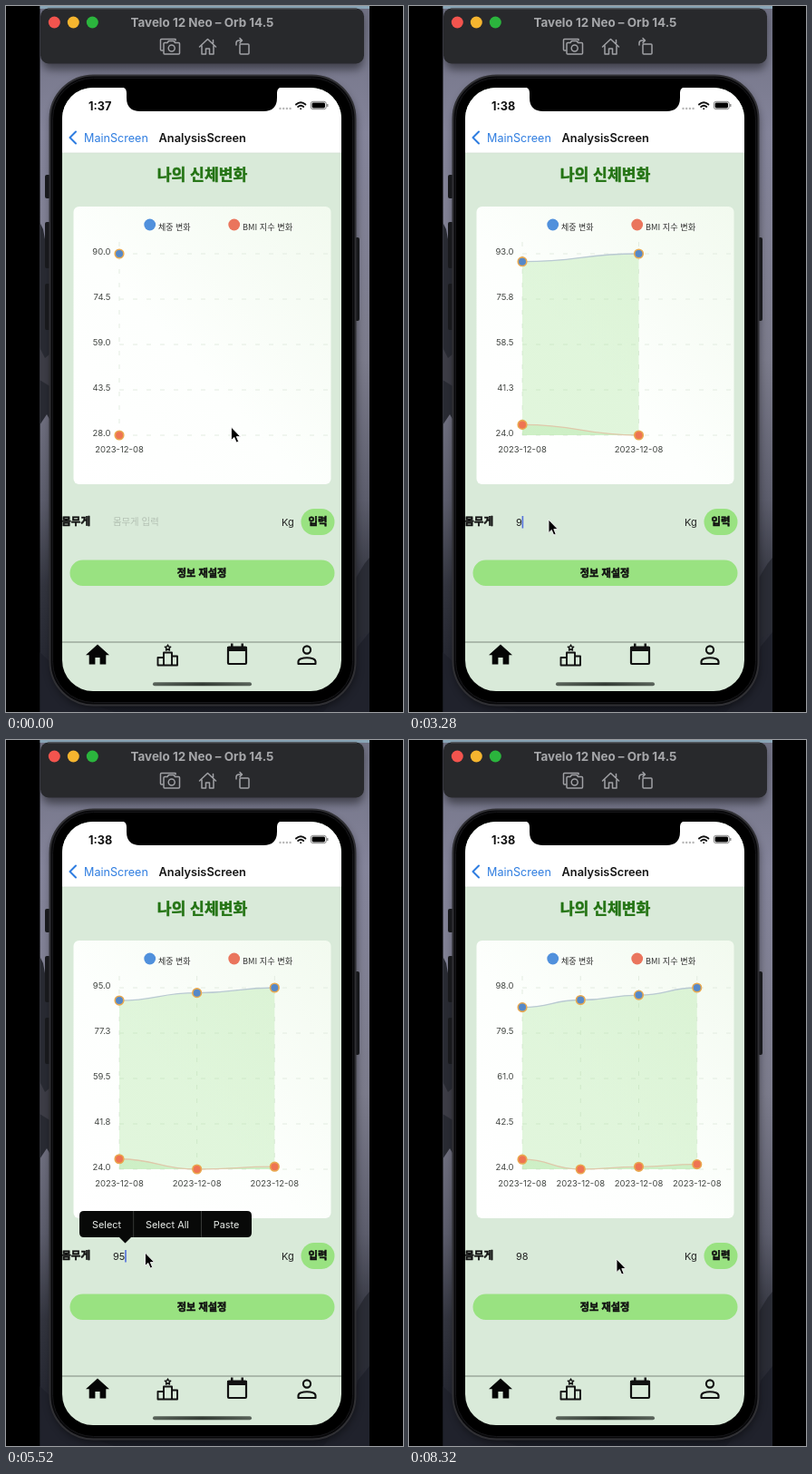
An HTML page for the animation above (8400 ms loop, 438 by 778 pixels).

```html
<!DOCTYPE html>
<html lang="ko">
<head>
<meta charset="utf-8">
<title>나의 신체변화</title>
<style>
  html, body { margin: 0; width: 100%; height: 100%; overflow: hidden; background: #000; }
  svg { display: block; width: 100%; height: 100%; filter: blur(.45px); font-family: Inter, 'Noto Sans CJK KR', 'Noto Sans CJK JP', sans-serif; }
  .ko { font-family: 'Noto Sans CJK KR', 'Noto Sans CJK JP', sans-serif; }
  .heavy { font-weight: 900; fill: #111; stroke: #111; stroke-width: .5; }
  .title { fill: #237313; stroke: #237313; }
  .mid { text-anchor: middle; }
  .end { text-anchor: end; }
  .line { fill: none; stroke-linejoin: round; stroke-linecap: round; }
</style>
</head>
<body>
<svg viewBox="0 0 438 778">
  <defs>
    <linearGradient id="sky" x2="0" y2="1">
      <stop offset="0" stop-color="#6f7082"/><stop offset=".18" stop-color="#84849a"/>
      <stop offset=".5" stop-color="#7b7b8b"/><stop offset=".7" stop-color="#5c5d6c"/>
      <stop offset=".82" stop-color="#33353f"/><stop offset="1" stop-color="#1c1e28"/>
    </linearGradient>
    <linearGradient id="card" x1="0" y1="1" x2="1" y2="0">
      <stop offset="0" stop-color="#fff"/><stop offset=".45" stop-color="#fdfffd"/><stop offset="1" stop-color="#f2faef"/>
    </linearGradient>
    <linearGradient id="area" gradientUnits="userSpaceOnUse" x1="0" y1="273" x2="0" y2="473">
      <stop offset="0" stop-color="#a8e39a" stop-opacity=".34"/><stop offset="1" stop-color="#a8e39a" stop-opacity=".34"/>
    </linearGradient>
    <linearGradient id="bar"><stop offset="0" stop-color="#59635a"/><stop offset=".5" stop-color="#343c35"/><stop offset="1" stop-color="#59635a"/></linearGradient>
    <clipPath id="wall"><rect x="37.5" width="363.5" height="778"/></clipPath>
    <clipPath id="screen"><rect x="62" y="90" width="308" height="665" rx="34"/></clipPath>
    <filter id="soft" x="-30%" y="-30%" width="160%" height="160%"><feGaussianBlur stdDeviation="5"/></filter>
  </defs>

  <rect width="438" height="778"/>
  <g clip-path="url(#wall)">
    <rect x="37" width="364" height="778" fill="url(#sky)"/>
    <rect x="37" width="364" height="3" fill="#8aa6b8"/>
    <path d="M37 238L41 246L45 268L52 290V462L45 450L37 462Z" fill="#292b33"/>
    <path d="M37 376L43 388L50 382V420L37 412Z" fill="#3d3d46"/>
    <path d="M401 608L396 614L391 622L384 634V700L401 690Z" fill="#2a2c35"/>
    <path d="M37 712L48 722L58 738L80 764L120 778H37ZM401 690L388 706L380 740L350 778H401Z" fill="#20222c"/>
    <rect x="40" y="8" width="354" height="62" rx="9" opacity=".45" filter="url(#soft)"/>
    <rect x="50" y="82" width="336" height="692" rx="48" opacity=".5" filter="url(#soft)"/>
  </g>

  <rect x="38" y="2.5" width="357" height="61" rx="9" fill="#28292c"/>
  <path d="M46 3H387" stroke="#55565a"/>
  <circle cx="53.3" cy="18" r="6.5" fill="#f3544e"/>
  <circle cx="74.3" cy="18" r="6.5" fill="#f5b52f"/>
  <circle cx="95.3" cy="18" r="6.5" fill="#2bb53d"/>
  <text class="mid" x="216.5" y="22.5" font-size="13.4" font-weight="700" fill="#a6a7aa">Tavelo 12 Neo – Orb 14.5</text>
  <g class="line" stroke="#a0a1a5" stroke-width="1.5">
    <path d="M173 49H171.5Q170.5 49 170.5 48V37.5Q170.5 36.5 171.5 36.5H187V38"/>
    <path d="M175 40.5H178L179.5 38.5H185L186.5 40.5H190.5Q191.5 40.5 191.5 41.5V52Q191.5 53 190.5 53H175Q174 53 174 52V41.5Q174 40.5 175 40.5Z"/>
    <circle cx="182.7" cy="46.5" r="3.5"/>
    <path d="M213.5 45L222.5 36.5L231.5 45M216 43.5V53H220.5V47H224.5V53H229V43.5M228.5 41V37.5"/>
    <path d="M258.5 42H267Q268 42 268 43V52Q268 53 267 53H259Q258 53 258 52V43Q258 42 259 42M254 43V41Q254 38 257 38H260M258 35.5L260.5 38L258 40.5"/>
  </g>

  <g fill="#18191c">
    <rect x="43" y="186" width="6" height="26" rx="2"/><rect x="43" y="238" width="6" height="51" rx="2"/>
    <rect x="43" y="306" width="6" height="51" rx="2"/><rect x="385" y="255" width="5" height="92" rx="2"/>
  </g>
  <rect x="48.5" y="76.5" width="337" height="694" rx="48" fill="#08080a" stroke="#303034" stroke-width="2"/>
  <rect x="51.5" y="79.5" width="331" height="688" rx="45" stroke="#17171a"/>

  <g clip-path="url(#screen)">
    <rect x="62" y="90" width="308" height="665" fill="#d9ead9"/>
    <rect x="62" y="90" width="308" height="72" fill="#fff"/>
    <path d="M62 162H370" stroke="#cfdccf" stroke-width=".7"/>
    <path d="M127 89Q133 90 133 96V101Q133 116 148 116H284Q299 116 299 101V96Q299 90 305 89Z"/>
    <text id="clock" x="91" y="114.5" font-size="12.7" font-weight="700" fill="#111"></text>
    <g fill="#b7b7b7"><circle cx="302.5" cy="113" r="1.2"/><circle cx="306.2" cy="113" r="1.2"/><circle cx="309.9" cy="113" r="1.2"/><circle cx="313.6" cy="113" r="1.2"/></g>
    <path class="line" d="M320 108.5Q325.2 103.8 330.4 108.5M322.2 111Q325.2 108.3 328.2 111M325.2 113.2V113.3" stroke="#111" stroke-width="1.9"/>
    <rect x="336.3" y="105.3" width="17" height="8.4" rx="2.5" fill="none" stroke="#777" stroke-width=".9"/>
    <rect x="337.6" y="106.6" width="14.4" height="5.8" rx="1.4"/><rect x="354.2" y="108" width="1.2" height="3" fill="#777"/>
    <path class="line" d="M77 138.5L70.5 145L77 151.5" stroke="#2f7de0" stroke-width="2"/>
    <text x="86" y="149.5" font-size="12.6" fill="#2f7de0">MainScreen</text>
    <text x="168.5" y="149.5" font-size="12.8" font-weight="600" fill="#151515">AnalysisScreen</text>
    <text class="ko heavy title mid" x="216.5" y="191.5" font-size="17.2">나의 신체변화</text>

    <rect x="74.5" y="221" width="284" height="306" rx="6" fill="url(#card)"/>
    <circle cx="158.7" cy="241" r="6.4" fill="#5090dc"/>
    <text class="ko" x="168" y="246.5" font-size="9" fill="#333">체중 변화</text>
    <circle cx="251.7" cy="241" r="6.4" fill="#ea755d"/>
    <text class="ko" x="261" y="246.5" font-size="9.2" fill="#333">BMI 지수 변화</text>
    <g id="chart"></g>

    <text class="ko heavy end" x="93" y="572" font-size="11.5">몸무게</text>
    <text id="hint" class="ko" x="118" y="572" font-size="10.4" fill="#b3c0b3">몸무게 입력</text>
    <text id="value" x="118" y="572.5" font-size="11" fill="#222"></text>
    <rect id="caret" y="562" width="1.6" height="13.5" fill="#526fdb"/>
    <text x="304" y="572.5" font-size="11" fill="#222">Kg</text>
    <rect x="325.5" y="554" width="37" height="29" rx="14.5" fill="#99e281"/>
    <text class="ko heavy mid" x="344" y="572.3" font-size="11.4">입력</text>
    <rect x="70.5" y="610.5" width="292" height="28.5" rx="14.25" fill="#99e281"/>
    <text class="ko heavy mid" x="216" y="629" font-size="11.2">정보 재설정</text>

    <g id="menu">
      <path d="M86 519H266Q271 519 271 524V543Q271 548 266 548H138L131.5 554.5L125 548H86Q81 548 81 543V524Q81 519 86 519Z" fill="#080908"/>
      <path d="M140.7 519V548M215.5 519V548" stroke="#4b504b" stroke-width=".7"/>
      <g class="mid" font-size="10.9" fill="#e8ece8"><text x="111" y="537.8">Select</text><text x="178" y="537.8">Select All</text><text x="243" y="537.8">Paste</text></g>
    </g>

    <path d="M62 701H370" stroke="#9ca89d" stroke-width="1.3"/>
    <path d="M101 703.5L114 715.3H110.3V725.6H103.6V718H98.4V725.6H91.7V715.3H88Z" fill="#050505"/>
    <g class="line" stroke="#111" stroke-width="1.9">
      <path d="M174 726.5V712.5H183V726.5M174 718H167.5V726.5H189V716.5H183"/>
      <path d="M178.5 704L179.5 706L181.7 706.3L180.1 707.8L180.5 710L178.5 709L176.5 710L176.9 707.8L175.3 706.3L177.5 706Z" stroke-width="1.4"/>
      <rect x="245" y="706.5" width="20" height="18.5" rx="1" stroke-width="2.2"/>
      <circle cx="332" cy="709.5" r="4.1" stroke-width="2.1"/>
      <path d="M322.5 725V722.5C322.5 716.8 341.5 716.8 341.5 722.5V725Z" stroke-width="2.1"/>
    </g>
    <path d="M244 706H266V711H244ZM248 702.5H250.5V707H248ZM259.5 702.5H262V707H259.5Z" fill="#111"/>
    <rect x="162" y="745.3" width="109" height="3.9" rx="1.95" fill="url(#bar)"/>
  </g>

  <path id="pointer" d="M0 0V14.5L3.3 11.4L5.7 17L8.1 15.9L5.8 10.6H10.2Z" stroke="#f4f4f4" stroke-width=".9"/>
</svg>
<script>
const LOOP = 8400, STEP = 80;
const $ = id => document.getElementById(id);

const WEIGHT = [90, 93, 95, 98], BMI = [28, 24, 25, 26];
const BASE = 473, HEIGHT = 200, LEFT = 125, SPAN = 257;

// Each list holds [start time, state].
const clockSteps = [[0, '1:37'], [560, '1:38']];
const countSteps = [[0, 1], [2320, 2], [4640, 3], [7680, 4]];
const valueSteps = [[0, ''], [1440, '9'], [1680, '93'], [3280, '9'], [3520, '95'],
  [6160, '9'], [6320, ''], [6960, '9'], [7120, '98']];
const focusSteps = [[0, false], [960, true], [7920, false]];
const menuSteps = [[0, false], [5360, true], [6000, false]];
const pointerPath = [[0, 248.5, 464], [400, 248.5, 464], [960, 204, 571], [1680, 204, 571],
  [2240, 337.5, 564], [2560, 337.5, 564], [3040, 154, 566], [3760, 154, 566],
  [4240, 309.5, 568], [4480, 338, 565], [4720, 338, 565], [5200, 153.5, 565],
  [7120, 153.5, 565], [7520, 338, 565], [7760, 338, 565], [8240, 229, 572]];

const stateAt = (steps, t) => steps.filter(s => s[0] <= t).pop()[1];

function pointerAt(t) {
  const next = pointerPath.findIndex(p => p[0] > t);
  if (next < 0) return pointerPath[pointerPath.length - 1].slice(1);
  const [t0, x0, y0] = pointerPath[next - 1], [t1, x1, y1] = pointerPath[next];
  const k = (t - t0) / (t1 - t0), e = k * k * (3 - 2 * k);
  return [x0 + (x1 - x0) * e, y0 + (y1 - y0) * e];
}

function curve(points) {
  return points.map(([x, y], i) => {
    if (!i) return `M${x} ${y}`;
    const [px, py] = points[i - 1], mx = (px + x) / 2, my = (py + y) / 2;
    return `Q${(px + mx) / 2} ${py} ${mx} ${my}Q${(mx + x) / 2} ${y} ${x} ${y}`;
  }).join('');
}

function chart(count) {
  const weights = WEIGHT.slice(0, count), bmis = BMI.slice(0, count);
  const max = Math.max(...weights), min = Math.min(...bmis);
  const xAt = i => LEFT + SPAN / count * i;
  const place = list => list.map((v, i) => [xAt(i), BASE - (v - min) / (max - min) * HEIGHT]);
  const series = [[place(weights), '#5688c8', '#b9c9d2'], [place(bmis), '#ee7452', '#dfc8aa']];
  let grid = '', labels = '', areas = '', dots = '';

  for (let k = 0; k <= 4; k++) {
    const y = BASE - HEIGHT + k * HEIGHT / 4;
    grid += `M${LEFT} ${y}H358`;
    labels += `<text class="end" x="115.5" y="${y + .8}">${(max - k * (max - min) / 4).toFixed(1)}</text>`;
  }
  for (let i = 0; i < count; i++) {
    grid += `M${xAt(i)} 260V${BASE}`;
    labels += `<text class="mid" x="${xAt(i)}" y="492.3">2023-12-08</text>`;
  }
  for (const [points, fill, stroke] of series) {
    const d = curve(points);
    if (count > 1) areas += `<path d="${d}V${BASE}H${LEFT}Z" fill="url(#area)"/>
      <path class="line" d="${d}" stroke="${stroke}" stroke-width="1.3"/>`;
    for (const [x, y] of points)
      dots += `<circle cx="${x}" cy="${y}" r="4.8" fill="${fill}" stroke="#e9a94f" stroke-width="1.6"/>`;
  }
  return `<path d="${grid}" fill="none" stroke="#e3ece1" stroke-dasharray="5 10"/>
    ${areas}${dots}<g font-size="9.5" fill="#444844">${labels}</g>`;
}

let shownCount = 0;
const show = (id, visible) => $(id).setAttribute('visibility', visible ? 'visible' : 'hidden');

function render(t) {
  const count = stateAt(countSteps, t), value = stateAt(valueSteps, t);
  if (count !== shownCount) $('chart').innerHTML = chart(shownCount = count);
  $('clock').textContent = stateAt(clockSteps, t);
  $('value').textContent = value;
  $('caret').setAttribute('x', 118 + value.length * 6.6);
  $('caret').setAttribute('opacity', value ? 1 : .6);
  show('hint', !value);
  show('caret', stateAt(focusSteps, t));
  show('menu', stateAt(menuSteps, t));
  $('pointer').setAttribute('transform', `translate(${pointerAt(t)})`);
}

const start = performance.now();
function tick() {
  const t = (performance.now() - start) % LOOP;
  render(Math.floor(t / STEP) * STEP);
  requestAnimationFrame(tick);
}
tick();
</script>
</body>
</html>
```
